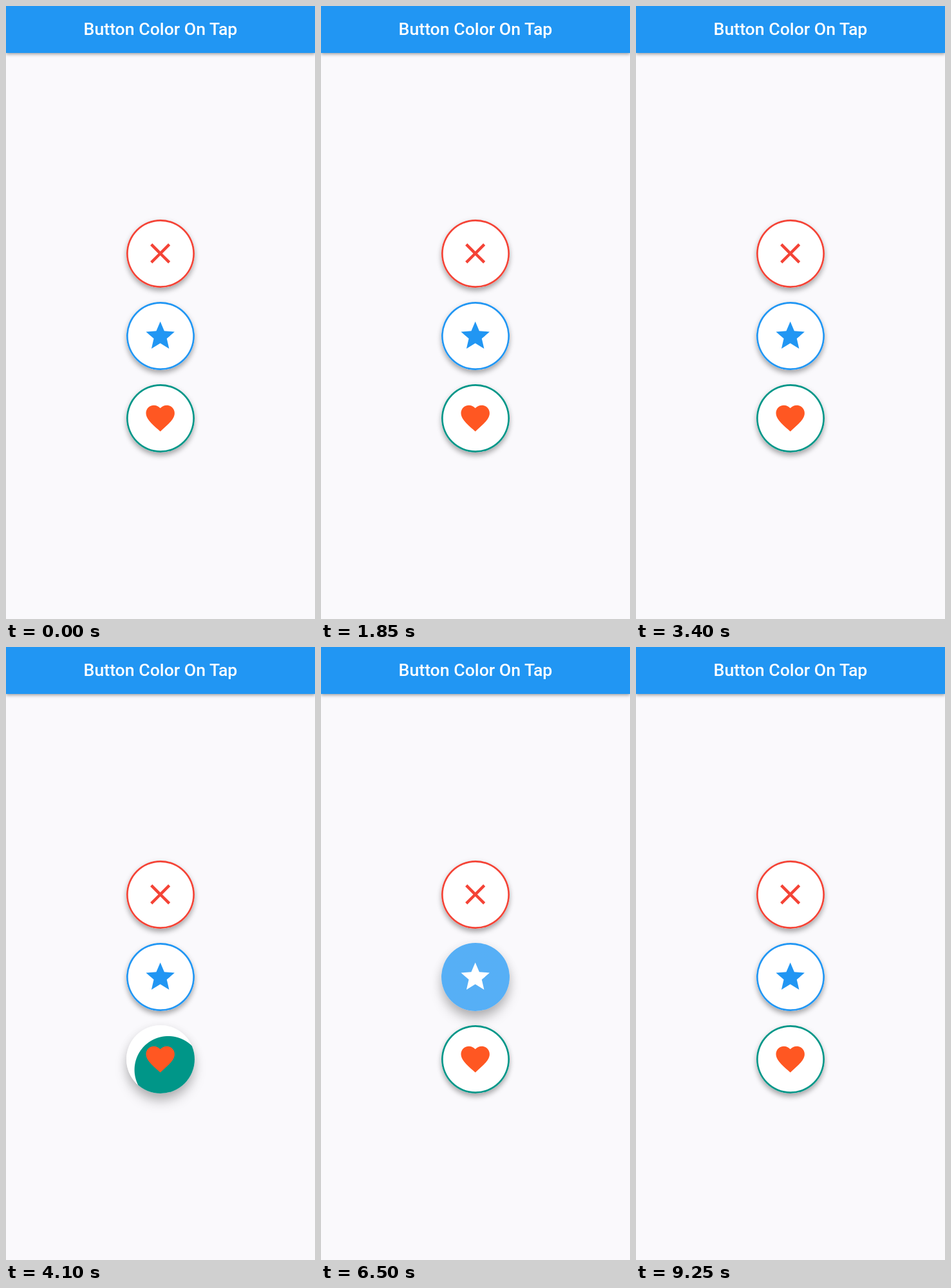
An HTML page that plays this animation: 480 px wide and 953 px high, repeating every 9.4 s.

```html
<!DOCTYPE html>
<html lang="en">
<head>
<meta charset="utf-8">
<title>Button Color On Tap</title>
<style>
  html, body { margin: 0; width: 100%; height: 100%; overflow: hidden; background: #faf9fc; }
  header {
    position: absolute; left: 0; top: 0; width: 480px; height: 73px;
    background: #2196f3; color: #fff; text-align: center;
    font: 500 26.67px/73px Roboto, sans-serif;
    box-shadow: 0 2px 5px rgba(0, 0, 0, .36);
  }
  .button, .ink, .ring { position: absolute; border-radius: 50%; }
  .button { left: 186.67px; width: 106.67px; height: 106.67px; }
  .ink { inset: 0; overflow: hidden; }
  .ring { inset: 0; box-sizing: border-box; border: 0 solid; }
  .button svg { position: absolute; left: 26.67px; top: 26.67px; width: 53.33px; height: 53.33px; }
</style>
</head>
<body>
<header>Button Color On Tap</header>
<script>
const LOOP = 9400, SIZE = 106.67, MID = SIZE / 2, REACH = 75.4;
const WHITE = [255, 255, 255], RED = [244, 67, 54], BLUE = [33, 150, 243],
      TEAL = [0, 150, 136], ORANGE = [255, 87, 34];

// Each press: [down ms, up ms, tap offset x, tap offset y] from the button centre
const buttons = [
  { y: 385, edge: RED, icon: RED, fill: RED, iconDown: WHITE, splash: [...WHITE, .24],
    path: 'M19 6.41L17.59 5 12 10.59 6.41 5 5 6.41 10.59 12 5 17.59 6.41 19 12 13.41 17.59 19 19 17.59 13.41 12z',
    presses: [[7900, 8930, 31, 40]] },
  { y: 513, edge: BLUE, icon: BLUE, fill: BLUE, iconDown: WHITE, splash: [...WHITE, .24],
    path: 'M12 17.27L18.18 21l-1.64-7.03L22 9.24l-7.19-.61L12 2 9.19 8.63 2 9.24l5.46 4.73L5.82 21z',
    presses: [[2200, 3000, 30, 32], [5800, 6800, 28, 32]] },
  { y: 641, edge: TEAL, icon: ORANGE, fill: WHITE, iconDown: ORANGE, splash: [...TEAL, 1],
    path: 'M12 21.35l-1.45-1.32C5.4 15.36 2 12.28 2 8.5 2 5.42 4.42 3 7.5 3c1.74 0 3.41.81 4.5 2.09C13.09 3.81 14.76 3 16.5 3 19.58 3 22 5.42 22 8.5c0 3.78-3.4 6.86-8.55 11.54L12 21.35z',
    presses: [[600, 1120, 26, 33], [3800, 5230, 24, 33]] }
];

const clamp = v => Math.max(0, Math.min(1, v));
const mix = (a, b, k) => a + (b - a) * k;
const rgb = c => `rgba(${c.join()})`;

function bezier(x1, y1, x2, y2) {
  const at = (a, b, u) => 3 * a * u * (1 - u) ** 2 + 3 * b * u * u * (1 - u) + u ** 3;
  return x => {
    let lo = 0, hi = 1;
    for (let i = 0; i < 24; i++) {
      const m = (lo + hi) / 2;
      if (at(x1, x2, m) < x) lo = m; else hi = m;
    }
    return at(y1, y2, (lo + hi) / 2);
  };
}
const ease = bezier(.25, .1, .25, 1);
const fastOutSlowIn = bezier(.4, 0, .2, 1);

for (const b of buttons) {
  b.el = document.createElement('div');
  b.el.className = 'button';
  b.el.style.top = b.y - MID + 'px';
  b.el.innerHTML = `<div class="ink"></div><svg viewBox="0 0 24 24"><path d="${b.path}"/></svg><div class="ring"></div>`;
  [b.ink, b.svg, b.ring] = b.el.children;
  document.body.append(b.el);
}

function shadow(lift) {
  const layer = (y, blur, spread, alpha) => `0 ${y}px ${blur}px ${spread}px rgba(0,0,0,${alpha})`;
  return [
    layer(mix(6, 13, lift), mix(9, 19, lift), mix(-1, -2, lift), mix(.27, .25, lift)),
    layer(mix(2, 4, lift), mix(8, 16, lift), 0, mix(.13, .11, lift))
  ].join();
}

function drawButton(b, t) {
  const press = b.presses.filter(p => p[0] <= t).pop();
  let lift = 0, down = false, ripple = 'none';
  if (press) {
    const [start, end, dx, dy] = press;
    const held = Math.min(t, end) - start, after = Math.max(0, t - end);
    down = t < end;
    lift = down ? fastOutSlowIn(clamp(held / 200)) : 1 - fastOutSlowIn(clamp(after / 200));

    // The ripple grows slowly while held, then fades after release
    const k = ease(clamp(held / 1000 + after / 225));
    const r = mix(REACH * .3, REACH + 5, k);
    const alpha = clamp(held / 75) * (1 - clamp((after - 225) / 150));
    const [red, green, blue, opacity] = b.splash;
    const color = rgb([red, green, blue, opacity * alpha]);
    const clear = rgb([red, green, blue, 0]);
    const x = MID + dx * (1 - k), y = MID + dy * (1 - k);
    ripple = `radial-gradient(circle at ${x}px ${y}px, ${color} ${r - .5}px, ${clear} ${r + .5}px)`;
  }
  b.ink.style.backgroundColor = rgb(down ? b.fill : WHITE);
  b.ink.style.backgroundImage = ripple;
  b.svg.style.fill = rgb(down ? b.iconDown : b.icon);
  b.el.style.boxShadow = shadow(lift);
  b.ring.style.borderColor = rgb(b.edge.map(c => c * (1 - lift)));
  b.ring.style.borderWidth = lift > .99 ? 0 : Math.max(1, 2.67 * (1 - lift)) + 'px';
  b.ring.style.opacity = clamp(2.67 * (1 - lift));
  // Whole-pixel CSS borders would thin the ring, so paint it as an inset shadow
  b.ring.style.boxShadow = `inset 0 0 0 ${2.67 * (1 - lift)}px ${b.ring.style.borderColor}`;
  b.ring.style.borderWidth = 0;
}

function frame(now) {
  const t = now % LOOP;
  for (const b of buttons) drawButton(b, t);
  requestAnimationFrame(frame);
}
frame(0);
</script>
</body>
</html>
```
